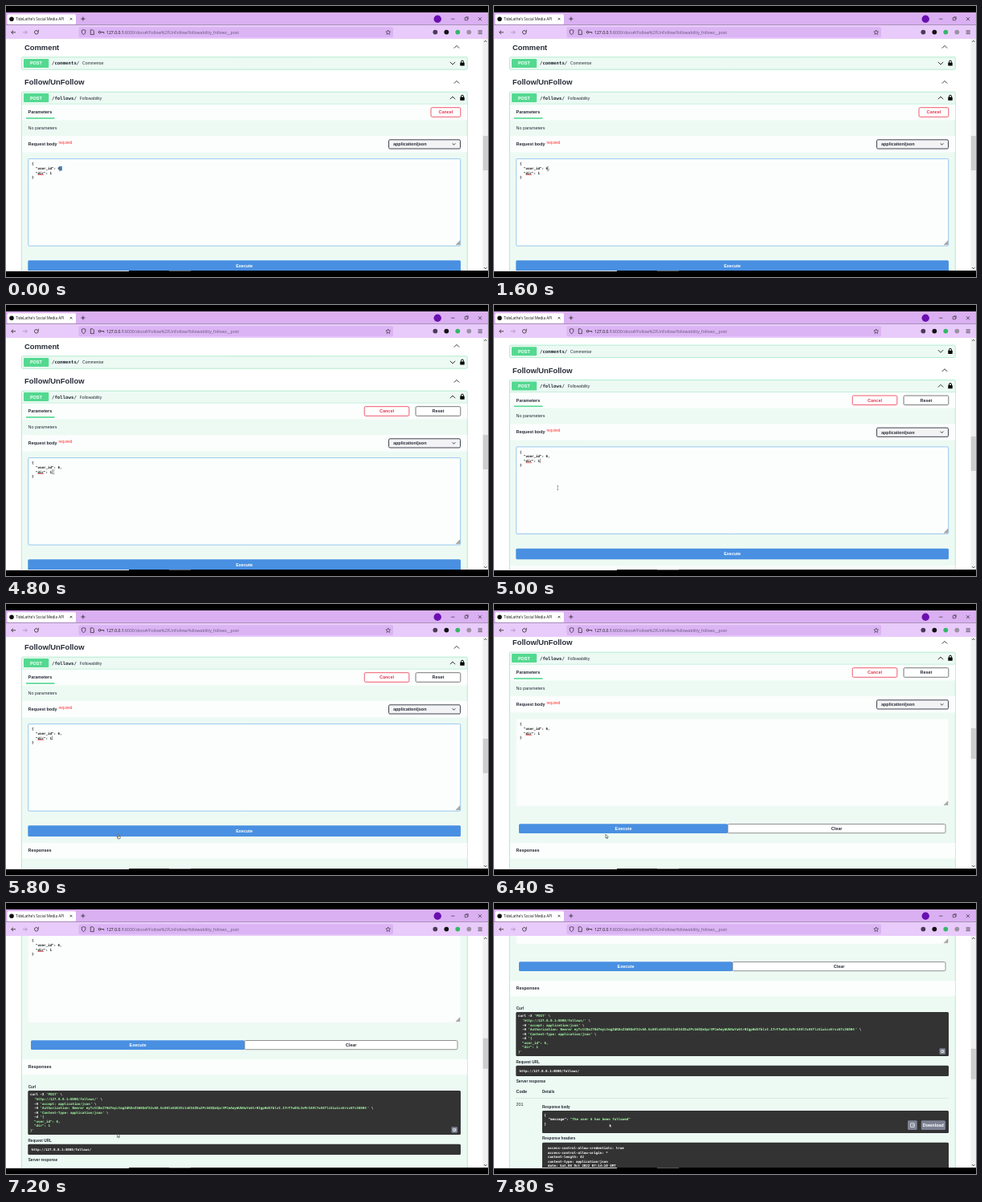
These frames come from a looping animation (600 by 338 pixels, 8000 ms). An HTML page with a canvas:

```html
<!DOCTYPE html>
<html lang="en">
<head>
<meta charset="utf-8">
<title>API docs walkthrough</title>
<style>
html, body { margin: 0; width: 100%; height: 100%; overflow: hidden; background: #000; }
canvas { display: block; width: 600px; height: 338px; }
</style>
</head>
<body>
<canvas id="stage"></canvas>
<script>
const LOOP = 8000, TICK = 200;
const INK = '#262b36', GREEN = '#53d990', EDGE = '#a3e8c6', PALE = '#edfaf4', BLUE = '#4990e2', RED = '#e2364f';
const DARK = '#333333', STRING = '#a2fca2', GREY = '#7d8293';
const SANS = '"Liberation Sans", Arial, sans-serif';
const MONO = '"DejaVu Sans Mono", monospace';
const CHROME = '"Open Sans", sans-serif';
const CODE_SIZE = 4.15, CODE_STEP = CODE_SIZE * 0.602, LINE = 5.55;

const canvas = document.getElementById('stage');
const ctx = canvas.getContext('2d');
const ratio = window.devicePixelRatio || 1;
canvas.width = 600 * ratio;
canvas.height = 338 * ratio;

// Fixed-seed filler for the bearer token
function makeToken(length) {
  const letters = 'ABCDEFGHIJKLMNOPQRSTUVWXYZabcdefghijklmnopqrstuvwxyz0123456789';
  let seed = 41, out = 'ey';
  while (out.length < length) {
    seed = (seed * 16807) % 2147483647;
    out += out.length === 36 || out.length === 97 ? '.' : letters[seed % letters.length];
  }
  return out;
}

const CURL = [
  "curl -X 'POST' \\",
  "  'http://127.0.0.1:8000/follows/' \\",
  "  -H 'accept: application/json' \\",
  `  -H 'Authorization: Bearer ${makeToken(140)}' \\`,
  "  -H 'Content-Type: application/json' \\",
  "  -d '{",
  '  "user_id": 6,',
  '  "dir": 1',
  "}'"
];
const HEADERS = [
  'access-control-allow-credentials: true',
  'access-control-allow-origin: *',
  'content-length: 42',
  'content-type: application/json',
  'date: Sat,08 Oct 2022 07:14:10 GMT'
];

// Keyframes: [time, value, ...]
const SCROLL = [[4800, 0], [5400, 41], [6000, 41], [6200, 47], [6600, 47], [7200, 150], [7800, 248]];
const POINTER = [[2400, 67, 203], [3200, 59.3, 208.3], [4800, 59.3, 208.3], [5600, 139.5, 287],
  [7200, 138.5, 287.5], [7800, 143.5, 275]];

function track(keys, t) {
  if (t <= keys[0][0]) return keys[0].slice(1);
  for (let i = 1; i < keys.length; i++) {
    const a = keys[i - 1], b = keys[i];
    if (t <= b[0]) {
      const k = (t - a[0]) / (b[0] - a[0]);
      return a.slice(1).map((v, j) => v + (b[j + 1] - v) * k);
    }
  }
  return keys[keys.length - 1].slice(1);
}

// Text is centred vertically on y
function text(str, x, y, { size = 5.46, color = INK, weight = 'bold', font = SANS, align = 'left' } = {}) {
  ctx.font = `${weight} ${size}px ${font}`;
  ctx.fillStyle = color;
  ctx.textAlign = align;
  ctx.fillText(str, x, y + size * 0.35);
}

function fill(x, y, w, h, color) {
  ctx.fillStyle = color;
  ctx.fillRect(x, y, w, h);
}

function box(x, y, w, h, { color, stroke, width = 0.8, radius = 1.5 }) {
  ctx.beginPath();
  ctx.roundRect(x, y, w, h, radius);
  if (color) { ctx.fillStyle = color; ctx.fill(); }
  if (stroke) { ctx.strokeStyle = stroke; ctx.lineWidth = width; ctx.stroke(); }
}

function path(points, { stroke = '#222', width = 0.8, color, close = false } = {}) {
  ctx.beginPath();
  points.forEach(([x, y]) => ctx.lineTo(x, y));
  if (close) ctx.closePath();
  if (color) { ctx.fillStyle = color; ctx.fill(); }
  ctx.strokeStyle = stroke;
  ctx.lineWidth = width;
  ctx.stroke();
}

function circle(x, y, r, color) {
  ctx.beginPath();
  ctx.arc(x, y, r, 0, Math.PI * 2);
  ctx.fillStyle = color;
  ctx.fill();
}

function chevron(x, y, up, r = 3.2) {
  const d = up ? -r / 4 : r / 4;
  path([[x - r, y - d * 2], [x, y + d * 2], [x + r, y - d * 2]], { width: 0.9 });
}

function cross(x, y, r) {
  path([[x - r, y - r], [x + r, y + r]], { width: 0.7 });
  path([[x + r, y - r], [x - r, y + r]], { width: 0.7 });
}

function lock(x, y) {
  box(x - 1.5, y - 3.4, 3, 4, { stroke: '#000', width: 1 });
  box(x - 2.7, y - 1, 5.4, 4.2, { color: '#000', radius: 0.5 });
}

function button(label, x, y, w, h, style) {
  box(x, y, w, h, style);
  text(label, x + w / 2, y + h / 2, { color: style.ink, align: 'center' });
}

function codeLine(str, x, y, color = '#fff') {
  text(str, x, y, { size: CODE_SIZE, font: MONO, color });
}

// Single-quoted spans are coloured, also across lines
function shellCode(lines, x, y) {
  let quoted = false;
  lines.forEach((line, row) => {
    let col = 0;
    for (const part of line.split(/(')/)) {
      if (part === "'") quoted = !quoted;
      codeLine(part, x + col * CODE_STEP, y + row * LINE, quoted || part === "'" ? STRING : '#fff');
      col += part.length;
    }
  });
}

function copyIcon(x, y, size) {
  box(x, y, size, size, { color: GREY, radius: 1.2 });
  const m = size * 0.3;
  box(x + m, y + m, size - 2 * m, size - 2 * m, { stroke: '#fff', width: 0.7, radius: 0.4 });
  path([[x + size * 0.45, y + size / 2], [x + size * 0.75, y + size / 2]], { stroke: '#fff', width: 0.6 });
}

function operation(y, route, summary, summaryX, open) {
  box(22, y - 5.5, 31.2, 11, { color: GREEN, radius: 1 });
  text('POST', 37.3, y, { color: '#fff', align: 'center' });
  text(route, 57, y, { size: 5.7, font: MONO });
  text(summary, summaryX, y + 0.2, { size: 5.07, weight: 'normal' });
  chevron(556, y, open);
  lock(568, y);
}

function drawEditor(t, focused) {
  const x = 32;
  const row = i => 197 + i * LINE;
  box(27.7, 190.6, 538, 108.6, { color: '#fcfefd', stroke: focused ? '#83bcec' : '#f1f8f5', radius: 1 });
  if (t < 200) fill(66.5, 199.8, 3.5, 5.4, '#4a94e4');
  codeLine('{', x, row(0), '#111');
  codeLine(`  "user_id": ${t < 1400 ? 0 : 6},`, x, row(1), '#111');
  codeLine('  "dir": 1', x, row(2), '#111');
  codeLine('}', x, row(3), '#111');
  fill(39.5, row(2) + 2, 7.5, 0.7, '#e33');
  const blinkOn = Math.floor((t - 3600) / 500) % 2 === 0;
  if (t >= 3200 && focused && blinkOn) fill(57, 205.3, 0.5, 5.6, '#333');
  path([[560, 297.8], [565, 292.8], [565, 297.8]], { color: '#aaa', stroke: '#888', width: 0.4, close: true });
}

function drawResponse() {
  const small = { size: 4.68 };
  text('Curl', 27.7, 379, small);
  box(27.3, 384, 538.7, 55, { color: DARK });
  shellCode(CURL, 30, 389);
  copyIcon(554.5, 429.3, 7.5);
  text('Request URL', 27.5, 446, small);
  box(27.3, 450.7, 538.7, 13.3, { color: DARK });
  codeLine('http://127.0.0.1:8000/follows/', 31.5, 457.3);
  text('Server response', 27.7, 470.7, small);
  text('Code', 27.5, 483.5);
  text('Details', 60, 483.5, small);
  fill(27, 491, 539, 0.5, '#c4d3cc');
  text('201', 27.5, 499, { weight: 'normal' });
  text('Response body', 60, 502.5, small);
  box(60, 507, 506, 28, { color: DARK });
  codeLine('{', 62.5, 512.3);
  codeLine('  "message": ', 62.5, 518);
  codeLine('"The user 6 has been followed"', 62.5 + 13 * CODE_STEP, 518, STRING);
  codeLine('}', 62.5, 523.6);
  copyIcon(515, 519.3, 11.7);
  button('Download', 531.7, 519.3, 30.3, 11.7, { color: GREY, ink: '#fff' });
  text('Response headers', 60, 541.7, small);
  box(60, 546.7, 506, 60, { color: DARK });
  HEADERS.forEach((line, i) => codeLine(line, 67, 553.5 + i * LINE));
}

function drawPage(t, scroll) {
  const executed = t >= 6200;
  ctx.save();
  ctx.beginPath();
  ctx.rect(0, 41, 600, 289);
  ctx.clip();
  fill(0, 41, 600, 289, '#fff');
  ctx.translate(0, -scroll);

  text('Comment', 23, 51.5, { size: 9.4 });
  chevron(561, 51, true);
  box(19.5, 63.8, 554.8, 15.4, { color: PALE, stroke: EDGE });
  operation(71.4, '/comments/', 'Commentar', 95, false);

  text('Follow/UnFollow', 23, 95, { size: 9.4 });
  chevron(561, 95, true);
  box(19.5, 107.2, 554.8, 600, { color: PALE, stroke: EDGE });
  operation(114.6, '/follows/', 'Followability', 91.7, true);

  fill(20, 122, 554, 20.3, '#fbfefd');
  fill(20, 121.8, 554, 0.6, EDGE);
  text('Parameters', 27.5, 132.3);
  fill(25, 139.2, 35.5, 1.6, GREEN);
  const reset = t >= 1800;
  button('Cancel', reset ? 446.2 : 529, 126.7, reset ? 55.6 : 36.8, 11.6,
    { color: '#fff', stroke: '#ee5a6c', width: 1, ink: RED });
  if (reset) button('Reset', 510, 126.7, 55.8, 11.6, { color: '#fff', stroke: '#777', width: 1, ink: INK });
  text('No parameters', 27.5, 151.6, { weight: 'normal' });

  fill(20, 162, 554, 20.3, '#fbfefd');
  text('Request body', 27.5, 172.2);
  text('required', 65.5, 170.3, { size: 4.6, color: '#f33', weight: 'normal' });
  box(476.5, 166.8, 89, 11.2, { color: '#f3f3f5', stroke: '#41444e', width: 1 });
  text('application/json', 482, 172.3);
  chevron(557.5, 172.3, false, 1.8);

  drawEditor(t, !executed);

  if (executed) {
    const split = t < 6600 ? 291 : 297;
    button('Execute', 31, 321.2, split - 31, 11.8, { color: BLUE, ink: '#fff' });
    button('Clear', split, 321.5, 562 - split, 11.2, { color: '#fff', stroke: '#777', ink: INK });
  } else {
    button('Execute', 27.3, 317.3, 538.7, 13.6, { color: BLUE, ink: '#fff' });
  }

  const top = executed ? 345 : 339;
  fill(20, top, 554, 19.3, '#fbfefd');
  text('Responses', 27.5, top + 9.5);
  if (executed) drawResponse();
  ctx.restore();

  fill(593.5, 41, 6.5, 289, '#f0f0f0');
  if (executed) fill(593.8, 155 + (scroll - 47) * 0.133, 6, 38, '#cdcdcd');
  else fill(593.8, 162 + scroll * 0.146, 6, 43, '#cdcdcd');
  chevron(596.8, 44, true, 1.5);
  chevron(596.8, 327, false, 1.5);

  // Sliver of the desktop below the window
  fill(0, 330, 153, 1, '#dcdcdc');
  fill(203, 330, 27, 1, '#555');
}

function drawBrowser() {
  const plain = { font: CHROME, weight: 'normal', color: '#111' };
  fill(0, 8, 600, 15.5, '#dab0f2');
  fill(0, 23.5, 600, 17.5, '#e9cbfb');
  box(1.5, 10.3, 85.5, 12.4, { color: '#fff' });
  circle(7, 16.2, 2.8, '#111');
  text("TideLathe's Social Media API", 12, 16.2, { ...plain, size: 4.6 });
  cross(81, 16.2, 1.3);
  path([[93.4, 16], [98.4, 16]]);
  path([[95.9, 13.5], [95.9, 18.5]]);
  circle(537.2, 16.2, 4.7, '#6a0fb0');
  path([[554, 16.2], [558.5, 16.2]], { width: 0.6 });
  box(571.2, 14.6, 3.2, 3.2, { stroke: '#222', width: 0.6, radius: 0 });
  path([[572.2, 13.6], [575.4, 13.6], [575.4, 16.8]], { width: 0.5 });
  cross(590, 16.2, 2);

  path([[12, 32.8], [6.8, 32.8]]);
  path([[9, 30.5], [6.7, 32.8], [9, 35.1]]);
  path([[21, 32.8], [26.2, 32.8]], { stroke: '#a68bb8' });
  path([[24, 30.5], [26.3, 32.8], [24, 35.1]], { stroke: '#a68bb8' });
  ctx.beginPath();
  ctx.arc(37.8, 32.8, 2.3, -0.3, 5.1);
  ctx.strokeStyle = '#222';
  ctx.lineWidth = 0.8;
  ctx.stroke();
  path([[38.4, 31.7], [40.4, 31.7], [40.4, 29.7]], { width: 0.7 });

  box(90.5, 26.2, 391.5, 13, { color: '#dbb4f4', radius: 2 });
  path([[94.2, 30.4], [96.6, 29.6], [99, 30.4], [98.6, 33.8], [96.6, 35.9], [94.6, 33.8]], { width: 0.7, close: true });
  path([[105.3, 29.8], [108, 29.8], [109.4, 31.2], [109.4, 35.6], [105.3, 35.6]], { width: 0.7, close: true });
  box(115.2, 31.4, 2.6, 2.6, { stroke: '#222', width: 0.8 });
  path([[117.8, 32.7], [121.8, 32.7], [121.8, 34.2]]);
  const host = '127.0.0.1';
  text(host, 125, 32.8, { ...plain, size: 5.14 });
  text(':8000/docs#/Follow%2FUnFollow/followability_follows__post', 125 + ctx.measureText(host).width, 32.8,
    { ...plain, size: 5.14, color: '#66557a' });
  const star = Array.from({ length: 10 }, (_, i) => {
    const a = -Math.PI / 2 + i * Math.PI / 5, r = i % 2 ? 1.4 : 3;
    return [475.7 + r * Math.cos(a), 33 + r * Math.sin(a)];
  });
  path(star, { width: 0.6, close: true });
  ['#4a3a58', '#111', '#35b768', '#9a91a2'].forEach((c, i) => circle(534.3 + i * 14, 32.6, 2.9, c));
  for (let i = -1; i <= 1; i++) path([[587.6, 32.7 + i * 1.9], [592.8, 32.7 + i * 1.9]], { width: 0.7 });
}

function drawPointer(t) {
  const [x, y] = track(POINTER, t);
  if (t < 5200) {
    const thin = { width: 0.5, stroke: '#555' };
    path([[x - 1, y - 2.6], [x + 1, y - 2.6]], thin);
    path([[x, y - 2.6], [x, y + 2.6]], thin);
    path([[x - 1, y + 2.6], [x + 1, y + 2.6]], thin);
  } else if (t >= 5400 && t < 6200) {
    box(x - 0.9, y + 2, 3.8, 3.8, { color: '#fff', stroke: '#222', width: 0.6 });
    box(x - 0.2, y, 1.2, 4, { color: '#fff', stroke: '#222', width: 0.5, radius: 0.6 });
  } else {
    const shape = [[0, 0], [0, 4.8], [1.1, 3.9], [1.8, 5.4], [2.5, 5.1], [1.9, 3.6], [3.3, 3.5]];
    path(shape.map(([dx, dy]) => [x + dx, y + dy]), { color: '#fff', stroke: '#111', width: 0.5, close: true });
  }
}

function draw(now) {
  const t = Math.floor((now % LOOP) / TICK) * TICK;
  ctx.setTransform(ratio, 0, 0, ratio, 0, 0);
  fill(0, 0, 600, 338, '#000');
  drawPage(t, track(SCROLL, t)[0]);
  drawBrowser();
  drawPointer(t);
}

const start = performance.now();
function frame() {
  draw(performance.now() - start);
  requestAnimationFrame(frame);
}
frame();
</script>
</body>
</html>
```
